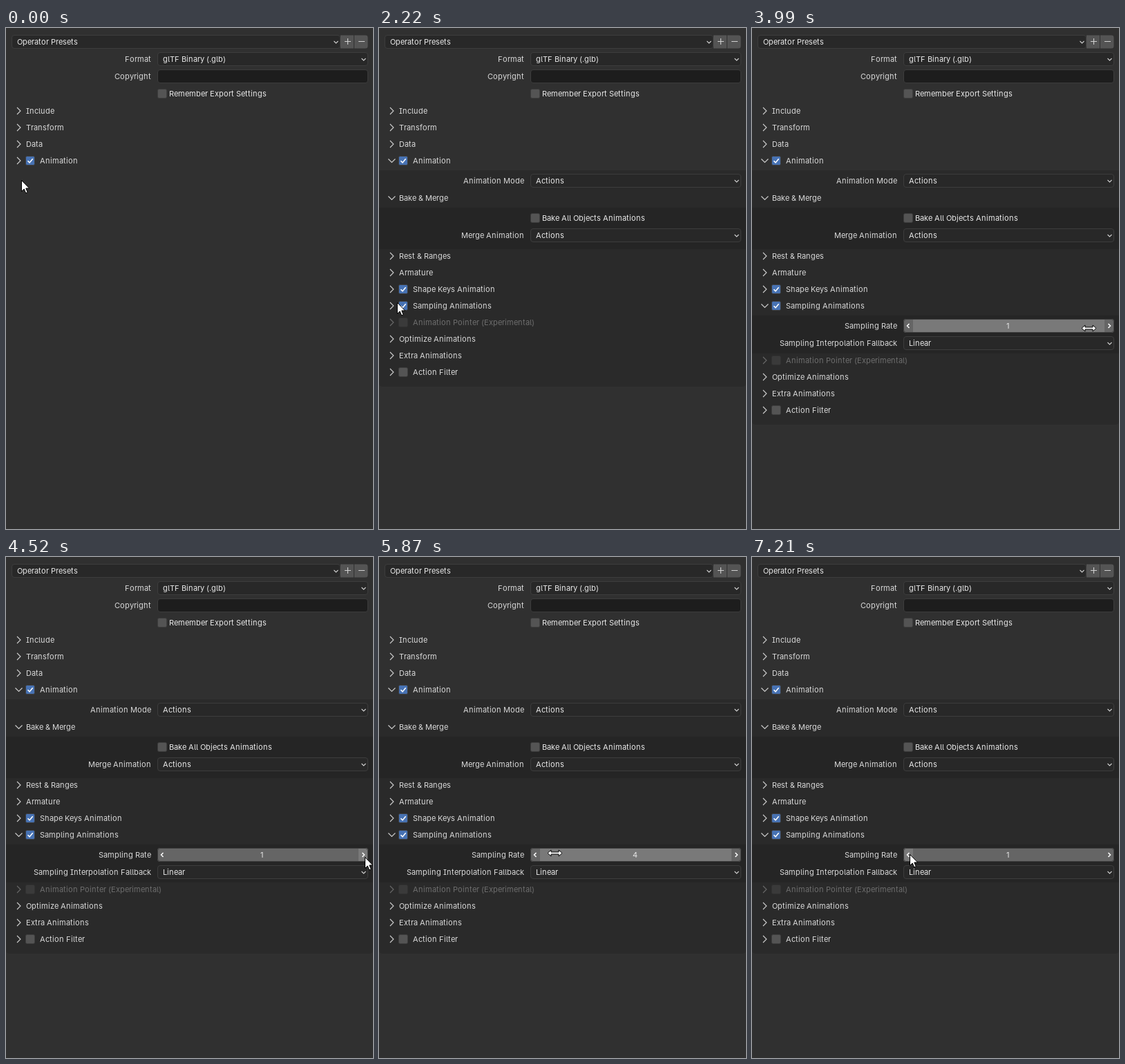
An HTML page for the animation above (8020 ms loop, 531 by 725 pixels).

```html
<!DOCTYPE html>
<html lang="en">
<head>
<meta charset="utf-8">
<title>Export settings</title>
<style>
  html, body { margin: 0; width: 100%; height: 100%; overflow: hidden; background: #303030; }
  svg { display: block; width: 531px; height: 725px; }
  text { font: 11px Inter, sans-serif; font-feature-settings: "cv05", "cv08"; fill: #d9d9d9; white-space: pre; }
  #probe { visibility: hidden; text-rendering: geometricPrecision; }
  .bright { fill: #e8e8e8; }
  .line { fill: none; stroke: #d0d0d0; stroke-width: 1.1; }
  .box { fill: #282828; stroke: #3d3d3d; }
  .entry { fill: #1d1d1d; }
  .btn { fill: #545454; }
  .on { fill: #4772b3; }
  .check { stroke: #3d3d3d; }
  .tick { fill: none; stroke: #fff; stroke-width: 1.6; }
  .body { fill: #000; fill-opacity: .122; }
  .off { opacity: .38; }
  .frame { fill: none; stroke: #3d3d3d; }
  .step { fill: none; stroke: #fff; stroke-width: 1.5; }
  .pointer { fill: #fff; stroke: #000; stroke-width: 1; }
</style>
</head>
<body>
<svg viewBox="0 0 531 725"><text id="probe"></text><g id="ui"></g></svg>
<script>
const LOOP = 8020;
const el = id => document.getElementById(id);

// Interface text sits on whole-pixel glyph advances, nudged up as hinting does.
const advances = {};
function advance(c) {
  if (!(c in advances)) {
    el('probe').textContent = c;
    advances[c] = Math.floor(el('probe').getComputedTextLength() + .55);
    el('probe').textContent = '';
  }
  return advances[c];
}

function label(str, x, y, cls = '', align = 'left') {
  const widths = [...str].map(advance);
  const total = widths.reduce((a, b) => a + b, 0);
  let at = align === 'right' ? x - total : align === 'mid' ? Math.round(x - total / 2) : x;
  const xs = widths.map(w => (at += w) - w).join(' ');
  return `<text class="${cls}" x="${xs}" y="${y + 4}">${str.replace('&', '&amp;')}</text>`;
}

const shape = (d, cls, id = '') => `<path class="${cls}" id="${id}" d="${d}"/>`;
const rect = (x, y, w, h, r, cls, id = '') =>
  `<rect class="${cls}" id="${id}" x="${x}" y="${y}" width="${w}" height="${h}" rx="${r}"/>`;
const closed = y => shape(`M16 ${y - 5}l5 5-5 5`, 'line');
const opened = y => shape(`M13.5 ${y - 2.5}l5 5 5-5`, 'line');
const down = (x, y) => shape(`M${x - 3} ${y - 1}l3 3 3-3`, 'line');
const name = (str, y) => label(str, 210, y, '', 'right');

function check(x, y, on) {
  return rect(x, y - 6.5, 13, 13, 2, on ? 'check on' : 'check btn') +
    (on ? shape(`M${x + 3} ${y + .3}l2.6 2.6 4.6-5.6`, 'tick') : '');
}

function menu(str, y, x = 219.5, right = 523.5) {
  return rect(x, y - 9.5, right - x, 19, 3.5, 'box') +
    label(str, x + 7.5, y, 'bright') + down(right - 6, y);
}

function header(str, y, mark, arrow = closed) {
  return arrow(y) + (mark === undefined ? '' : check(28.5, y, mark)) +
    label(str, mark === undefined ? 29 : 49, y);
}

const base =
  menu('Operator Presets', 20, 8.5, 483.5) +
  rect(484, 10.5, 19, 19, 0, 'btn') +
  shape('M504 10.5h16a3.5 3.5 0 0 1 3.5 3.5v12a3.5 3.5 0 0 1-3.5 3.5h-16z', 'btn') +
  shape('M490 19.5h9M494.5 15v9M510 19.5h9', 'line') +
  name('Format', 45) + menu('glTF Binary (.glb)', 45) +
  name('Copyright', 70) + rect(219.5, 60.5, 304, 19, 3.5, 'box entry') +
  check(219.5, 95) + label('Remember Export Settings', 236, 95, 'bright') +
  ['Include', 'Transform', 'Data'].map((s, i) => header(s, 120 + 24 * i)).join('') +
  check(28.5, 192, true) + label('Animation', 49, 192);

const panel =
  shape('', 'body', 'back') + rect(0, 260, 531, 60, 0, 'body') +
  opened(192) + name('Animation Mode', 221) + menu('Actions', 221) +
  header('Bake & Merge', 246, undefined, opened) +
  check(219.5, 275) + label('Bake All Objects Animations', 236, 275, 'bright') +
  name('Merge Animation', 300) + menu('Actions', 300) +
  header('Rest & Ranges', 330) + header('Armature', 354) +
  header('Shape Keys Animation', 378, true) +
  check(28.5, 402, true) + label('Sampling Animations', 49, 402);

const sampling =
  rect(0, 416, 531, 55, 0, 'body') + opened(402) +
  name('Sampling Rate', 431) +
  `<clipPath id="round">${rect(219, 421, 305, 20, 4, '')}</clipPath><g clip-path="url(#round)">` +
  rect(219, 421, 14, 20, 0, '', 'left') +
  rect(233, 421, 277, 20, 0, '', 'mid') +
  rect(510, 421, 14, 20, 0, '', 'right') + '</g>' +
  rect(219.5, 421.5, 304, 19, 3.5, 'frame') +
  shape('M227.5 428l-3 3 3 3M515.5 428l3 3-3 3', 'step', 'steps') +
  '<g id="value"></g>' +
  name('Sampling Interpolation Fallback', 456) + menu('Linear', 456);

const tail =
  `<g class="off">${header('Animation Pointer (Experimental)', 426, false)}</g>` +
  header('Optimize Animations', 450) + header('Extra Animations', 474) +
  header('Action Filter', 498, false);

el('ui').innerHTML = base +
  `<g id="shut">${closed(192)}</g><g id="panel">${panel}` +
  `<g id="fold">${closed(402)}</g><g id="sampling">${sampling}</g><g id="tail">${tail}</g></g>` +
  shape('M.5 .5V16.5L4.2 13 6.7 18.9 9.2 17.8 6.8 12H11.7Z', 'pointer', 'arrow') +
  shape('M-10.5 0l5-4.5v3h11v-3l5 4.5-5 4.5v-3h-11v3z', 'pointer', 'resize');

const show = (id, on) => el(id).style.display = on ? '' : 'none';
const place = (id, x, y) => el(id).setAttribute('transform', `translate(${x} ${y})`);

// Each move: first step, last step, step count, bend point, end point, steady pace.
const home = [22, 220];
const moves = [
  [70, 280, 4, [19, 205], [13, 194]],
  [1300, 2070, 12, [0, 300], [26, 394]],
  [2140, 2490, 6, [28, 400], [16, 405]],
  [3150, 3920, 12, [240, 428], [487, 434]],
  [4060, 4270, 4, [503, 434], [519, 434]],
  [5460, 5870, 7, [390, 434], [254, 428], true],
  [5940, 5940, 1, [235, 431], [221, 435]],
  [6140, 6340, 4, [224, 432], [228, 430]]
];
const presses = [[4720, 4790], [4980, 5120], [5260, 5400], [6540, 6680], [6880, 6950], [7080, 7210]];
const values = [[4790, 2], [5120, 3], [5400, 4], [6680, 3], [6950, 2], [7210, 1]];

function pointerAt(t) {
  let from = home;
  for (const [t0, t1, n, bend, end, steady] of moves) {
    if (t < t0) return from;
    if (t < t1) {
      const k = Math.floor((t - t0) * (n - 1) / (t1 - t0)) + 1;
      const raw = k / n, u = steady ? raw : raw * raw * (3 - 2 * raw), v = 1 - u;
      return from.map((a, i) => Math.round(a * v * v + 2 * bend[i] * u * v + end[i] * u * u));
    }
    from = end;
  }
  return from;
}

let shown = 0;
function draw(t) {
  const open = t >= 750, wide = t >= 2670;
  show('shut', !open);
  show('panel', open);
  show('fold', !wide);
  show('sampling', wide);
  place('tail', 0, wide ? 55 : 0);
  const foot = wide ? 574 : 519;
  el('back').setAttribute('d', `M0 206H531V${foot - 5}q0 5-5 5H5q-5 0-5-5z`);

  const [x, y] = pointerAt(t);
  const over = wide && x >= 219 && x < 524 && y >= 421 && y < 441;
  const zone = !over ? '' : x < 233 ? 'left' : x < 510 ? 'mid' : 'right';
  const held = presses.some(([a, b]) => t >= a && t < b);
  for (const id of ['left', 'mid', 'right']) {
    const hot = id === zone;
    el(id).style.fill = !over ? '#545454' : held ? (hot ? '#2c2c2c' : '#202020') : hot ? '#797979' : '#656565';
  }
  show('steps', over);

  const value = values.reduce((v, [at, n]) => t >= at ? n : v, 1);
  if (value !== shown) {
    el('value').innerHTML = label(String(value), 370, 431, 'bright', 'mid');
    shown = value;
  }
  show('arrow', zone !== 'mid');
  show('resize', zone === 'mid');
  place('arrow', x, y);
  place('resize', x + .5, y + .5);
}

const start = performance.now();
function tick() {
  draw((performance.now() - start) % LOOP);
  requestAnimationFrame(tick);
}
draw(0);
requestAnimationFrame(tick);
</script>
</body>
</html>
```
